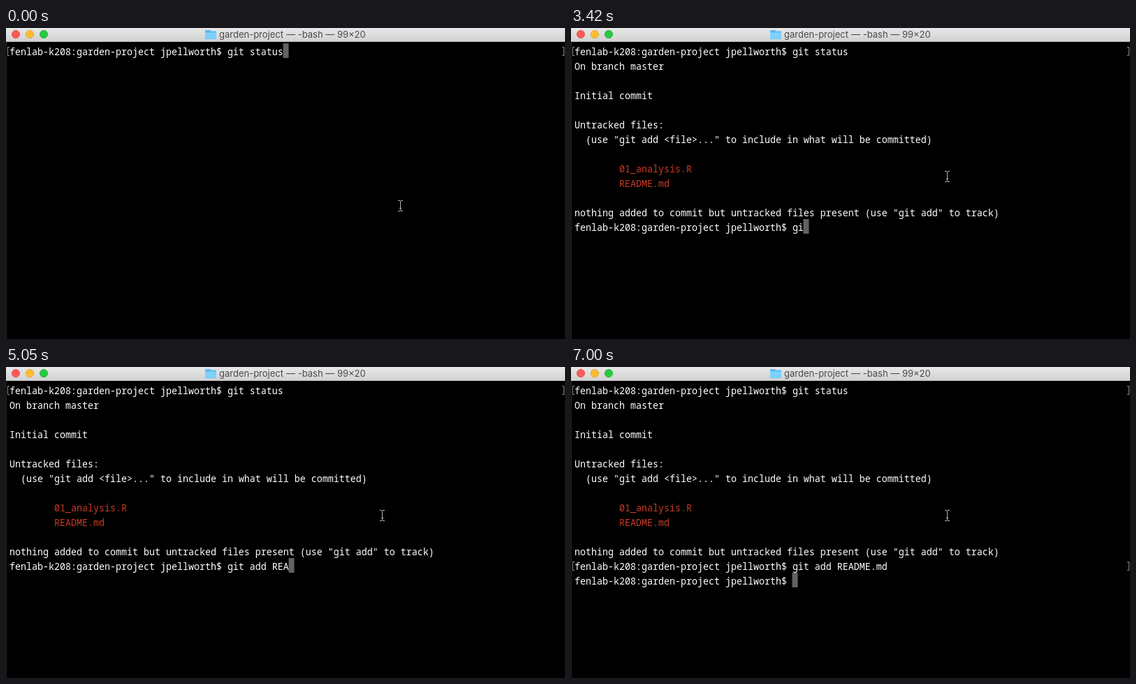
Animation, 800 px wide and 446 px high, one loop 8000 ms. Source, as an HTML page with a canvas:

```html
<!DOCTYPE html>
<html lang="en">
<head>
<meta charset="utf-8">
<title>Terminal</title>
<style>
  html, body { margin: 0; width: 100%; height: 100%; overflow: hidden; background: #000; }
  canvas { display: block; width: 800px; height: 446px; }
</style>
</head>
<body>
<canvas id="stage" width="800" height="446"></canvas>
<script>
const ctx = document.getElementById('stage').getContext('2d');

const LOOP = 8000;
const CELL = 8, ROW = 21, LEFT = 5, TOP = 22;
const FACE_HEIGHT = 1.11; // tall terminal face
const RED = '#c93a24';

const FOLDER = 'garden-project';
const PROMPT = `fenlab-k208:${FOLDER} jpellworth$ `;
const COMMAND = 'git add README.md';
const STATUS_AT = 1480, ENTER_AT = 7000;

const STATUS = [
  'On branch master',
  '',
  'Initial commit',
  '',
  'Untracked files:',
  '  (use "git add <file>..." to include in what will be committed)',
  '',
  '        01_analysis.R',
  '        README.md',
  '',
  'nothing added to commit but untracked files present (use "git add" to track)'
];

// [time, characters typed]
const TYPING = [
  [0, 0], [3420, 2], [3570, 4], [3860, 5], [4010, 6], [4160, 7], [4300, 8],
  [4900, 9], [5050, 11], [5200, 12], [5500, 14], [5950, 15], [6250, 16], [6550, 17]
];

// [time, x, y]
const POINTER = [[0, 564, 255], [740, 559, 240], [880, 543, 214], [1030, 538, 213]];

// [fill, rim]
const BUTTONS = [['#fc5b57', '#e5504b'], ['#fdbd2f', '#e3a62c'], ['#28c940', '#22b338']];

const latest = (steps, t) => steps.filter(step => step[0] <= t).pop();

function rect(color, x, y, w, h) {
  ctx.fillStyle = color;
  ctx.fillRect(x, y, w, h);
}

function drawFolder() {
  ctx.fillStyle = '#5dbbec';
  ctx.beginPath();
  ctx.roundRect(285, 3, 8, 5, 1);
  ctx.roundRect(285, 4.5, 16, 11.5, 1);
  ctx.fill();
  ctx.fillStyle = '#7dd2fb';
  ctx.beginPath();
  ctx.roundRect(285, 6.5, 16, 9, 1);
  ctx.fill();
}

function drawTitleBar() {
  const shade = ctx.createLinearGradient(0, 0, 0, 19);
  shade.addColorStop(0, '#e7e7e7');
  shade.addColorStop(1, '#d2d2d2');
  rect(shade, 0, 0, 800, 19);
  rect('#b4b4b4', 0, 19, 800, 1);

  ctx.lineWidth = 1;
  BUTTONS.forEach(([fill, rim], i) => {
    ctx.fillStyle = fill;
    ctx.strokeStyle = rim;
    ctx.beginPath();
    ctx.arc(14 + 20 * i, 9, 5.5, 0, Math.PI * 2);
    ctx.fill();
    ctx.stroke();
  });

  drawFolder();
  ctx.font = '13px Inter, sans-serif';
  ctx.fillStyle = '#4a4a4a';
  ctx.fillText(FOLDER, 305, 14);
  ctx.fillText('— -bash — 99×20', 401, 14);
}

function drawLine(text, row, color = '#fff') {
  ctx.save();
  ctx.translate(LEFT, TOP + row * ROW + 17);
  ctx.scale(1, FACE_HEIGHT);
  ctx.font = '500 13.3333px "Noto Sans Mono", monospace';
  ctx.fillStyle = color;
  ctx.fillText(text, 0, 0);
  ctx.restore();
}

function drawMarks(row) {
  const y = TOP + row * ROW + 5.5;
  ctx.strokeStyle = '#8c8c8c';
  ctx.lineWidth = 1;
  ctx.beginPath();
  for (const [spine, tip] of [[2.5, 5], [798.5, 796]]) {
    ctx.moveTo(tip, y);
    ctx.lineTo(spine, y);
    ctx.lineTo(spine, y + 12);
    ctx.lineTo(tip, y + 12);
  }
  ctx.stroke();
}

function drawPrompt(row, typed, active) {
  const line = PROMPT + typed;
  if (active) rect('#626262', LEFT + line.length * CELL - 0.5, TOP + row * ROW, CELL, ROW);
  drawLine(line, row);
}

function drawPointer(x, y) {
  ctx.save();
  ctx.translate(x + 0.5, y);
  ctx.strokeStyle = '#b4b4b4';
  ctx.lineWidth = 1;
  ctx.beginPath();
  ctx.moveTo(0, -7);
  ctx.lineTo(0, 7);
  for (const end of [-7.5, 7.5]) {
    for (const side of [-1, 1]) {
      ctx.moveTo(side * 3.5, end);
      ctx.lineTo(side * 0.5, end);
    }
  }
  ctx.moveTo(-1.5, 3.5);
  ctx.lineTo(1.5, 3.5);
  ctx.stroke();
  ctx.restore();
}

function draw(t) {
  rect('#000', 0, 0, 800, 446);
  rect('#222', 0, 20, 1, 426);
  drawTitleBar();
  drawMarks(0);
  drawPrompt(0, 'git status', t < STATUS_AT);

  if (t >= STATUS_AT) {
    const entered = t >= ENTER_AT;
    STATUS.forEach((text, i) => drawLine(text, i + 1, i === 7 || i === 8 ? RED : '#fff'));
    drawPrompt(12, COMMAND.slice(0, latest(TYPING, t)[1]), !entered);
    if (entered) {
      drawMarks(12);
      drawPrompt(13, '', true);
    }
  }

  const [, x, y] = latest(POINTER, t);
  drawPointer(x, y);
}

const start = performance.now();
function frame() {
  draw((performance.now() - start) % LOOP);
  requestAnimationFrame(frame);
}
frame();
</script>
</body>
</html>
```
